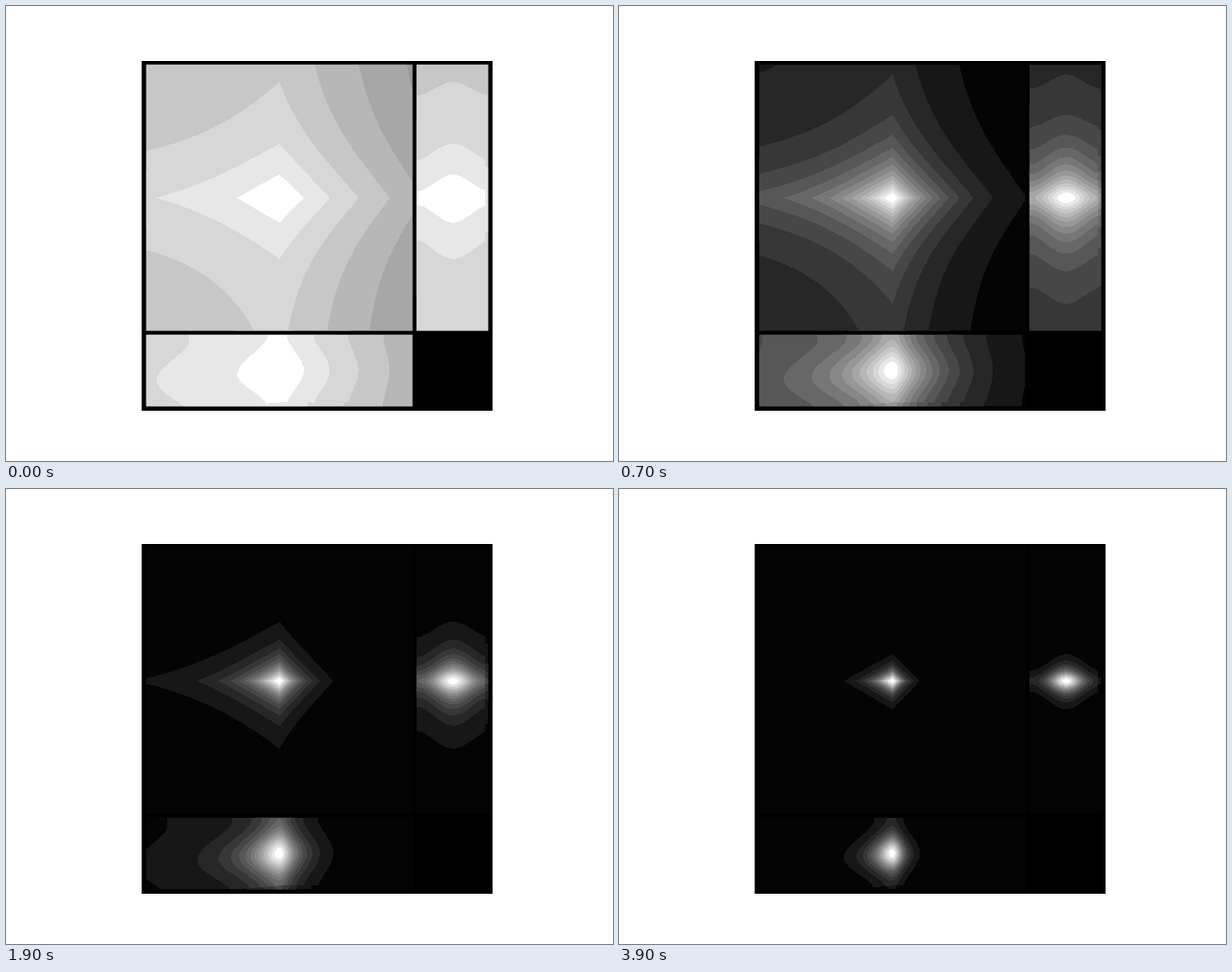
An HTML page with a canvas for the animation above (4 s loop, 640 by 480 pixels).

```html
<!DOCTYPE html>
<html lang="en">
<head>
<meta charset="utf-8">
<title>Sharpening peak</title>
<style>
  html, body { margin: 0; width: 100%; height: 100%; overflow: hidden; background: #fff; }
  canvas { display: block; }
</style>
</head>
<body>
<canvas id="stage" width="640" height="480"></canvas>
<script>
const ctx = document.getElementById('stage').getContext('2d');
const BOX = { x: 143, y: 58, w: 370, h: 369 };
const PEAK = { x: 288, y: 202 };
const STEP = 100, STEPS = 40;

const bell = (d, width) => Math.exp(-(d / width) * (d / width));
const ease = t => t * t * (3 - 2 * t);

// Decay along one arm: a straight slope that flattens near `bend`.
const arm = (d, slope, bend) => slope * d / Math.hypot(1, d / bend);

// Decay in the large view, a crossed ridge with a rounded top.
function ridge(dx, dy) {
  const h = dx < 0 ? arm(-dx, 0.0015, 116) : 0.00245 * dx;
  const v = dy < 0 ? arm(-dy, 0.0026, 102) : arm(dy, 0.0025, 88);
  const sum = h + v - (dx < 0 ? 3 : 1.1) * h * v;
  return sum * (1 - Math.exp(-sum / 0.018));
}

// Extra decay across the depth of the side views, strongest near the peak.
function depth(z, fade) {
  const rim = z >= 34 ? 0.018 * fade : 0;
  return 0.049 * ease(Math.min(1, Math.abs(z) / 38)) * (0.2 + 0.8 * fade) + rim;
}

function sideView(x, y) {
  const dy = y - PEAK.y;
  return ridge(0, dy) + depth(x - 471, bell(dy, 55));
}

function bottomView(x, y) {
  const dx = x - PEAK.x, sag = Math.max(0, -dx * 0.08);
  return ridge(dx, 0) + depth(y - 384 - sag, bell(dx, 80));
}

const decay = new Float32Array(BOX.w * BOX.h);
const light = new Float32Array(BOX.w * BOX.h);

// Share of the pixel at p that lies between a and b.
const cover = (p, a, b) => Math.min(p + 1, b) - Math.max(p, a);

function panel(x0, y0, x1, y1, view) {
  for (let y = Math.floor(y0); y < y1; y++) {
    for (let x = Math.floor(x0); x < x1; x++) {
      const i = (y - BOX.y) * BOX.w + x - BOX.x;
      decay[i] = view(x, y);
      light[i] = cover(x, x0, x1) * cover(y, y0, y1);
    }
  }
}

panel(147.7, 61.7, 428.7, 342.7, (x, y) => ridge(x - PEAK.x, y - PEAK.y));
panel(432.7, 61.7, 508.5, 342.7, sideView);
panel(147.7, 346.7, 428.7, 422.5, bottomView);

// Sixteen grey levels.
function shade(v) {
  const q = Math.floor(v / 16);
  return q === 0 ? 4 : q >= 15 ? 255 : q * 16 + 7;
}

const img = ctx.createImageData(BOX.w, BOX.h);
const pixels = new Uint32Array(img.data.buffer);

function draw(power) {
  for (let i = 0; i < pixels.length; i++) {
    const g = light[i] ? shade(255 * light[i] * Math.exp(-decay[i] * power)) : 0;
    pixels[i] = 0xff000000 | g * 0x10101;
  }
  ctx.putImageData(img, BOX.x, BOX.y);
}

let shown = -1;
function tick() {
  const step = Math.floor(performance.now() / STEP) % STEPS;
  if (step !== shown) {
    shown = step;
    draw(step + 1);
  }
  requestAnimationFrame(tick);
}
tick();
</script>
</body>
</html>
```
